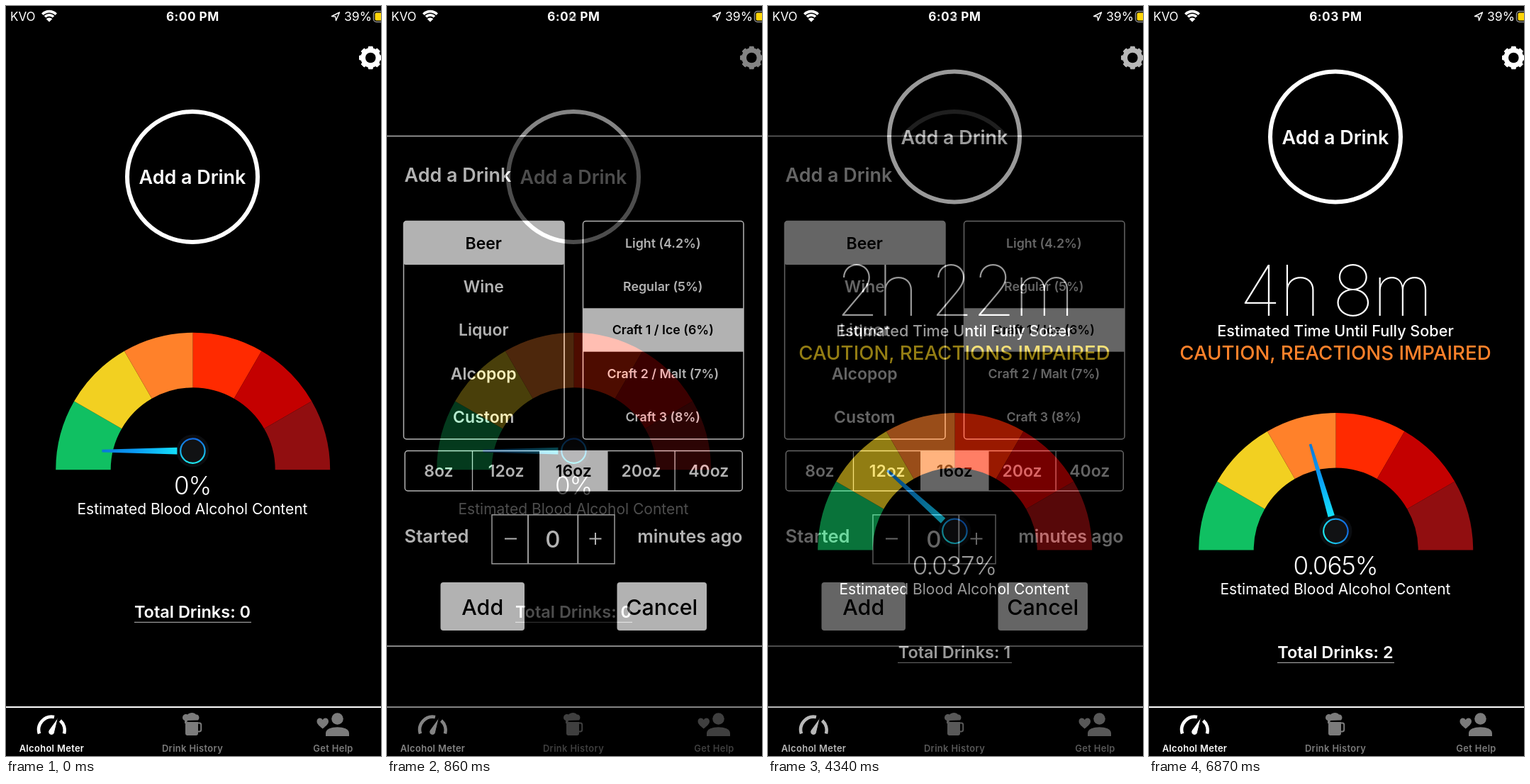
Animation, 529 px wide and 1058 px high, one loop 8000 ms. Source, as an HTML page:

```html
<!DOCTYPE html>
<html lang="en">
<head>
<meta charset="utf-8">
<title>Alcohol meter</title>
<style>
  html, body { margin: 0; width: 100%; height: 100%; overflow: hidden; background: #000; }
  svg { display: block; width: 100vw; height: 100vh; }
  text { font-family: Inter, Roboto, "Liberation Sans", sans-serif; font-optical-sizing: none; white-space: pre; }
  .timer { word-spacing: -7px; }
</style>
</head>
<body>
<svg id="stage" viewBox="0 0 529 1058"></svg>
<script>
const WHITE = '#fff', GREY = '#7b7b7b';
const CENTER = 263;
const LOOP = 8000, STEP = 60, STEPS = 10;
const FADES = [500, 4040, 6330];
const SECTORS = ['#10c062', '#f2d021', '#ff812a', '#ff2a00', '#c40000', '#910e10'];

const text = (value, x, y, size, { weight = 500, fill = WHITE, anchor = 'middle', spacing = 0 } = {}) =>
  `<text x="${x}" y="${y}" font-size="${size}" font-weight="${weight}" fill="${fill}" ` +
  `text-anchor="${anchor}" letter-spacing="${spacing}">${value}</text>`;

const rect = (x, y, w, h, fill = 'none', stroke = 'none', rx = 0) =>
  `<rect x="${x}" y="${y}" width="${w}" height="${h}" fill="${fill}" stroke="${stroke}" stroke-width="1.5" rx="${rx}"/>`;

const line = (x1, y1, x2, y2, width = 1.5, stroke = WHITE) =>
  `<path d="M${x1} ${y1}L${x2} ${y2}" stroke="${stroke}" stroke-width="${width}"/>`;

const polar = (cx, cy, r, degrees) => {
  const a = degrees * Math.PI / 180;
  return `${(cx + r * Math.cos(a)).toFixed(2)} ${(cy + r * Math.sin(a)).toFixed(2)}`;
};

function statusBar(clock) {
  const arc = r => `<path d="M${polar(61, 21, r, -136)}A${r} ${r} 0 0 1 ${polar(61, 21, r, -44)}"/>`;
  return text('KVO', 6, 21, 17, { weight: 400, anchor: 'start' }) +
    `<g fill="none" stroke="${WHITE}" stroke-width="3.6">${arc(8.3)}${arc(13.4)}</g>` +
    `<path d="M61 22.5L${polar(61, 22.5, 6, -136)}A6 6 0 0 1 ${polar(61, 22.5, 6, -44)}Z" fill="${WHITE}"/>` +
    text(clock, CENTER + 0.3, 21, 17.2, { weight: 700, spacing: 0.5 }) +
    `<path d="M459.5 14.5L470.5 9L465.5 20.5L464.8 15Z" fill="none" stroke="${WHITE}" stroke-width="1.4" stroke-linejoin="round"/>` +
    text('39%', 477, 21, 17.6, { weight: 400, anchor: 'start' }) +
    rect(518.5, 7.5, 40, 15, 'none', '#8d8d8d', 4) +
    rect(520.5, 9.5, 30, 11, '#ffd60a', 'none', 2);
}

function gear() {
  const cx = 514.3, cy = 73, points = [];
  for (let k = 0; k < 8; k++) {
    const mid = k * 45;
    points.push(polar(cx, cy, 13.6, mid - 14), polar(cx, cy, 16, mid - 10),
      polar(cx, cy, 16, mid + 10), polar(cx, cy, 13.6, mid + 14));
  }
  return `<path d="M${points.join('L')}Z" fill="${WHITE}" stroke="${WHITE}" stroke-linejoin="round"/>` +
    `<circle cx="${cx}" cy="${cy}" r="7.3" fill="#000"/>`;
}

function tabBar() {
  const label = (value, x, fill) => text(value, x, 1052, 12.9, { weight: 600, fill, spacing: 0.35 });
  return line(0, 989, 529, 989, 2) +
    `<path d="M47 1026.5A18.3 18.3 0 0 1 68 1003M76.5 1008A18.3 18.3 0 0 1 82 1026.5" fill="none" stroke="${WHITE}" stroke-width="4.6"/>
    <path d="M73.5 1003.5L68.5 1024.5A4.4 4.4 0 1 1 60.5 1021.5Z" fill="${WHITE}" stroke="#000" stroke-width="1"/>
    <g fill="${GREY}">
      <path d="M249 1004C249 1000 253 998 256 999.5C259 996 266 996 268 999.5C272 999 274 1004 271 1007.5L256 1008L255 1012H252V1008C250 1007 249 1006 249 1004Z"/>
      <path d="M253 1010H271V1026A3 3 0 0 1 268 1029H256A3 3 0 0 1 253 1026Z"/>
      <path d="M270 1011.5H273A2.5 2.5 0 0 1 275.2 1014V1021A2.5 2.5 0 0 1 273 1023.5H270" fill="none" stroke="${GREY}" stroke-width="2"/>
      <circle cx="467.5" cy="1005.5" r="8.3"/>
      <path d="M451 1030V1026C451 1020 459 1017.3 467.5 1017.3S484 1020 484 1026V1030Z"/>
      <path d="M446.7 1019.5C442 1015.5 438.5 1013 438.5 1009C438.5 1004 444.5 1003 446.7 1007C449 1003 455 1004 455 1009C455 1013 451.5 1015.5 446.7 1019.5Z"/>
    </g>` +
    label('Alcohol Meter', 64.5, WHITE) + label('Drink History', CENTER, GREY) + label('Get Help', 461.5, GREY);
}

function gauge(baseY, angle) {
  const cx = 263.7, outer = 193.5, inner = 116;
  const sectors = SECTORS.map((fill, i) => {
    const from = 180 + i * 30, to = from + 30;
    return `<path fill="${fill}" d="M${polar(cx, baseY, outer, from)}A${outer} ${outer} 0 0 1 ${polar(cx, baseY, outer, to)}` +
      `L${polar(cx, baseY, inner, to)}A${inner} ${inner} 0 0 0 ${polar(cx, baseY, inner, from)}Z"/>`;
  }).join('');
  return sectors + `<g transform="translate(${CENTER + 0.4} ${baseY - 26.7}) rotate(${angle})">
    <circle r="23" fill="#0b0d10"/>
    <path d="M-128 -1.8L-22 -4.8V4.8L-128 1.8Z" fill="url(#needle)"/>
    <circle r="17.2" fill="#111214" stroke="url(#ring)" stroke-width="2.2"/>
  </g>`;
}

function homeBody({ sober, caution, bac, angle, drinks }) {
  const titleY = sober ? 185 : 241.5;
  const baseY = sober ? 767.5 : 654.3;
  const totalY = sober ? 920 : 863;
  const underline = drinks === 1 ? 80.5 : 82.5;
  return gear() +
    `<circle cx="${CENTER}" cy="${titleY - 0.5}" r="92" fill="none" stroke="${WHITE}" stroke-width="6"/>` +
    text('Add a Drink', CENTER, titleY + 9.8, 26.9, { weight: 600 }) +
    (sober ? `<g class="timer">${text(sober, CENTER, 437, 99, { weight: 100, spacing: -2.3 })}</g>` +
      text('Estimated Time Until Fully Sober', CENTER, 466, 21.6) +
      text('CAUTION, REACTIONS IMPAIRED', CENTER, 499, 27.7, { fill: caution }) : '') +
    gauge(baseY, angle) +
    text(bac, CENTER, baseY + 34.5, 35, { weight: 300, spacing: -1.1 }) +
    text('Estimated Blood Alcohol Content', CENTER, baseY + 62.7, 21, { weight: 400 }) +
    text(`Total Drinks: ${drinks}`, CENTER, totalY, 23.5, { weight: 600 }) +
    line(CENTER + 0.5 - underline, totalY + 6.3, CENTER + 0.5 + underline, totalY + 6.3, 1.3, '#999') +
    tabBar();
}

function list(x, items, selected, size) {
  const top = 303.5, row = 61.4, width = 226.5;
  return rect(x, top, width, 307.5, 'none', WHITE, 4) +
    rect(x, top + selected * row, width, row, WHITE, 'none', selected ? 0 : 3) +
    items.map((item, i) => text(item, x + width / 2 - 0.5, top + (i + 0.5) * row + size * 0.364,
      size, { weight: 600, fill: i === selected ? '#000' : WHITE })).join('');
}

function dialog() {
  const sizes = ['8oz', '12oz', '16oz', '20oz', '40oz'].map((size, i) => {
    const x = 25.3 + i * 95.2, on = i === 2;
    return (on ? rect(x, 627.5, 95.2, 56.5, WHITE) : '') + (i ? line(x, 627.5, x, 684, 1.3) : '') +
      text(size, x + 47.6, 663.5, 23, { weight: 600, fill: on ? '#000' : WHITE });
  }).join('');
  const button = (label, x, width) =>
    rect(x, 813, width, 68, WHITE, 'none', 4) + text(label, x + width / 2, 858.5, 30.4, { fill: '#000' });
  return rect(0, 183, 529, 720, '#000') + line(0, 183.5, 529, 183.5, 1.6) + line(0, 903, 529, 903, 1.6) +
    text('Add a Drink', 24.5, 248, 26.9, { weight: 600, anchor: 'start' }) +
    list(23.5, ['Beer', 'Wine', 'Liquor', 'Alcopop', 'Custom'], 0, 23) +
    list(276.5, ['Light (4.2%)', 'Regular (5%)', 'Craft 1 / Ice (6%)', 'Craft 2 / Malt (7%)', 'Craft 3 (8%)'], 2, 17.8) +
    sizes + rect(25.3, 627.5, 476, 56.5, 'none', WHITE, 4) +
    text('Started', 24.5, 756.5, 25.6, { weight: 600, anchor: 'start' }) +
    text('minutes ago', 501.5, 756.5, 25, { weight: 600, anchor: 'end' }) +
    rect(148, 717.8, 173, 69, 'none', '#ddd') +
    line(199, 717.8, 199, 786.8, 2, '#ddd') + line(269.3, 717.8, 269.3, 786.8, 2, '#ddd') +
    line(166, 751.5, 183, 751.5, 2) + line(285.5, 751.5, 302.5, 751.5, 2) + line(294, 743, 294, 760, 2) +
    text('0', 234, 763.5, 33) +
    button('Add', 75.5, 118.5) + button('Cancel', 324.5, 126.5);
}

const start = { bac: '0%', angle: 0, drinks: 0 };
const oneDrink = { sober: '2h 22m', caution: '#f5d020', bac: '0.037%', angle: 42, drinks: 1 };
const twoDrinks = { sober: '4h 8m', caution: '#ff812a', bac: '0.065%', angle: 73.7, drinks: 2 };

const scenes = [
  homeBody(start) + statusBar('6:00 PM'),
  `<g opacity="0.31">${homeBody(start)}</g>` + dialog() + statusBar('6:02 PM'),
  homeBody(oneDrink) + statusBar('6:03 PM'),
  homeBody(twoDrinks) + statusBar('6:03 PM'),
];

const stage = document.getElementById('stage');
stage.innerHTML = `<defs>
    <linearGradient id="needle" gradientUnits="userSpaceOnUse" x1="-128" y1="0" x2="-22" y2="0">
      <stop offset="0" stop-color="#0a78d8"/><stop offset="0.45" stop-color="#0a9cf5"/><stop offset="1" stop-color="#14e0fa"/>
    </linearGradient>
    <linearGradient id="ring" gradientUnits="userSpaceOnUse" x1="0" y1="-18" x2="0" y2="18">
      <stop offset="0" stop-color="#1268e0"/><stop offset="1" stop-color="#1ce8ee"/>
    </linearGradient>
  </defs>` + scenes.map(body => `<g class="scene">${rect(0, 0, 529, 1058, '#000')}${body}</g>`).join('');
const layers = [...stage.querySelectorAll('.scene')];

// Each scene dissolves over the previous one in ten equal steps.
function render(t) {
  const opacity = [1, ...FADES.map(at =>
    t < at ? 0 : Math.min(STEPS, Math.floor((t - at) / STEP) + 1) / STEPS)];
  layers.forEach((layer, i) => {
    layer.style.opacity = opacity[i];
    layer.style.display = opacity[i] === 0 || opacity[i + 1] === 1 ? 'none' : '';
  });
}

const origin = performance.now();
function tick() {
  render((performance.now() - origin) % LOOP);
  requestAnimationFrame(tick);
}
tick();
</script>
</body>
</html>
```
